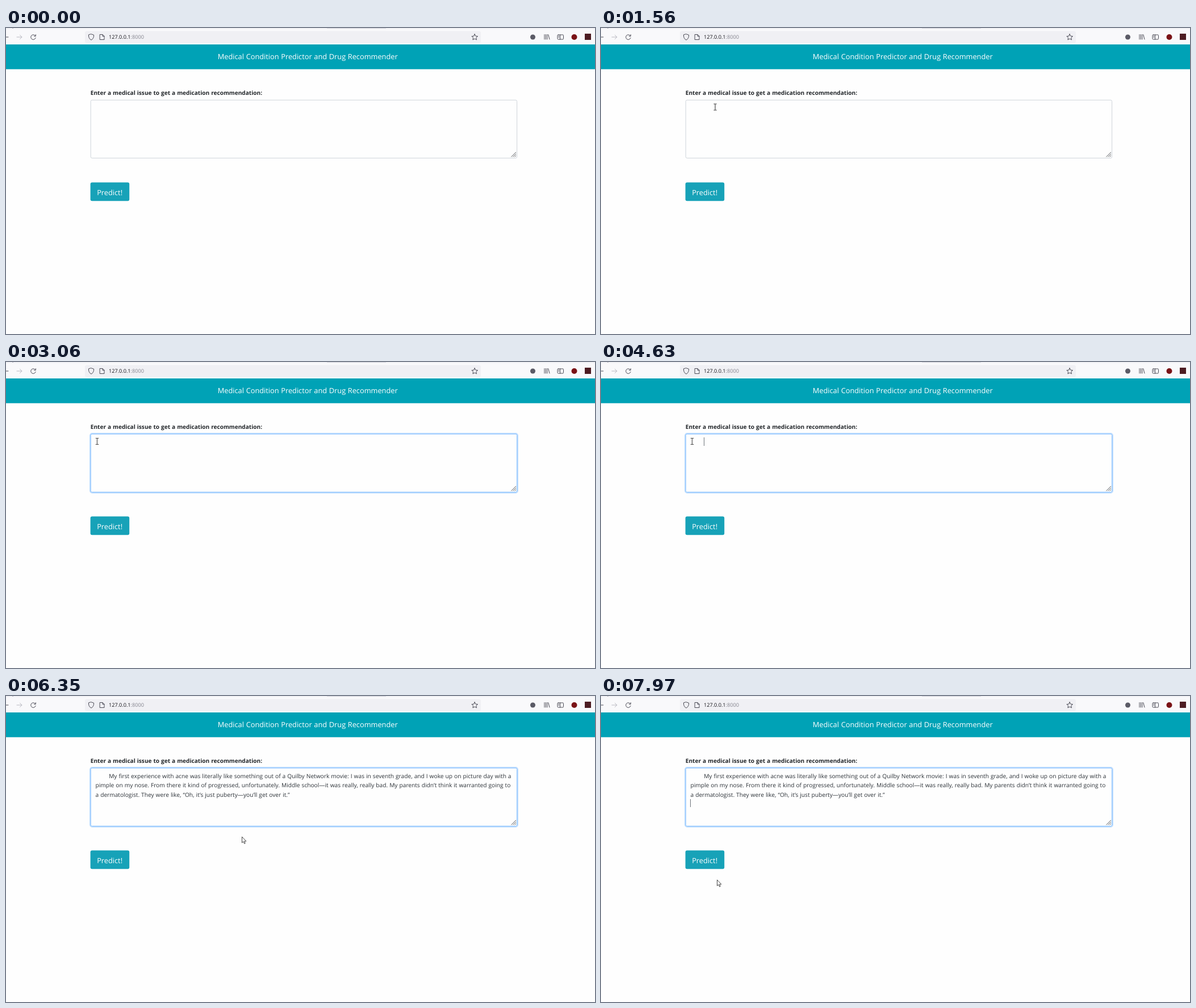
An HTML page for the animation above (8 s loop, 1037x540 px).

```html
<!DOCTYPE html>
<html lang="en">
<head>
<meta charset="utf-8">
<title>Medical Condition Predictor</title>
<style>
html, body { margin: 0; width: 100%; height: 100%; overflow: hidden; background: #fefefe; }
svg { display: block; }
text { font-family: "Open Sans", "Noto Sans", sans-serif; text-rendering: geometricPrecision; white-space: pre; }

.icon { fill: none; stroke: #4a4a55; stroke-width: 1; stroke-linecap: round; stroke-linejoin: round; }
.icon .off { stroke: #b9b9c1; }
.url { font-size: 9.15px; fill: #15141a; }
.url tspan { fill: #85858f; }
.large { font-size: 12.78px; word-spacing: .38px; fill: #fff; }
.label { font-size: 10.1px; font-weight: 700; word-spacing: .36px; fill: #212529; }
.entry { font-size: 10.19px; word-spacing: .36px; fill: #2c3238; }
.caret { fill: #6f757b; }

/* One 8 s clock drives every part */
.anim { animation: 8s step-end infinite; }
#field { animation-name: border; }
#ring { animation-name: ring; }
#caret1 { animation-name: caret1; }
#caret2 { animation-name: caret2; }
#entry { animation-name: paste; }
#pointer { animation-name: move; }
#arrow { animation-name: arrow; }
#beam { animation-name: beam; }

@keyframes border {
  0% { stroke: #ced4da; }
  32% { stroke: #a9c9ec; }
  32.75%, 100% { stroke: #80bdff; }
}
@keyframes ring {
  0% { opacity: 0; }
  32% { opacity: .03; }
  32.75%, 100% { opacity: .25; }
}
@keyframes caret1 {
  0%, 38.25%, 51.125%, 62.875%, 100% { opacity: 0; }
  30.375%, 44.5%, 57.875% { opacity: 1; }
}
@keyframes caret2 {
  0%, 65.375%, 78.375%, 92% { opacity: 0; }
  62.875%, 71.25%, 85.125%, 98.75%, 100% { opacity: 1; }
}
@keyframes paste {
  0% { opacity: 0; }
  62.875%, 100% { opacity: 1; }
}
@keyframes arrow {
  0%, 14.25% { opacity: 0; }
  7.5%, 78.375%, 100% { opacity: 1; }
}
@keyframes beam {
  0%, 78.375%, 100% { opacity: 0; }
  14.25% { opacity: 1; }
}
@keyframes move {
  0% { transform: translate(904px, 491px); }
  7.5% { transform: translate(904px, 491px); animation-timing-function: steps(2); }
  9.25% { transform: translate(488px, 232px); }
  14.25% { transform: translate(470px, 224px); animation-timing-function: steps(3); }
  16.875% { transform: translate(315px, 165px); animation-timing-function: steps(3); }
  19.5% { transform: translate(201px, 139.5px); animation-timing-function: steps(2); }
  21.125% { transform: translate(162.5px, 136px); }
  25.25% { transform: translate(161.5px, 138.5px); }
  26.125% { transform: translate(160.5px, 140px); }
  71.25% { transform: translate(165px, 142px); animation-timing-function: steps(4); }
  74.75% { transform: translate(278px, 183px); animation-timing-function: steps(4); }
  78.375% { transform: translate(397px, 236px); }
  79.375% { transform: translate(415px, 248px); }
  80.25% { transform: translate(427px, 266px); }
  81.125% { transform: translate(433px, 279px); }
  81.875% { transform: translate(434px, 282px); }
  97% { transform: translate(395px, 291px); animation-timing-function: steps(3); }
  99.625%, 100% { transform: translate(204px, 324px); }
}
</style>
</head>
<body>
<svg width="1037" height="540" viewBox="0 0 1037 540">
  <!-- Browser toolbar -->
  <rect width="1037" height="30" fill="#f9f9fb"/>
  <rect width="1037" height="1.5" fill="#f0f0f4"/>
  <rect x="565" width="104" height="1" fill="#d3d3dc"/>
  <rect x="11" width="2" height="1" fill="#b5b5be"/>
  <rect x="139" y="5.5" width="697" height="21" rx="3" fill="#f0f0f4"/>

  <g class="icon">
    <path d="M0 16H4"/>
    <path class="off" d="M19 16H28M24.5 12.5L28 16L24.5 19.5"/>
    <path d="M51.6 13.7A4.3 4.3 0 1 0 52.2 17.3M52.3 11.6V14.4H49.5"/>
    <path d="M150 10.8L154.6 12.3C154.8 16.5 153.2 19.6 150 21.2C146.8 19.6 145.2 16.5 145.4 12.3Z"/>
    <path d="M165.5 11.5H170L173 14.5V20.5H165.5ZM170 11.5V14.5H173"/>
    <path d="M825.2 10.8L826.8 14.2L830.5 14.6L827.8 17.1L828.5 20.8L825.2 19L821.9 20.8L822.6 17.1L819.9 14.6L823.6 14.2Z"/>
    <path d="M948 11.5V20M950.5 11.5V20M953 11.5V20M954.8 11.7L957 20"/>
    <rect x="971" y="12" width="10.5" height="8" rx="1.3"/>
    <path d="M975.5 12V20M972.8 14.3H973.8M972.8 16.3H973.8"/>
  </g>
  <circle cx="927.5" cy="16" r="4.5" fill="#5b5b66"/>
  <circle cx="1000.5" cy="16" r="5" fill="#7a1216"/>
  <rect x="1019" y="10" width="11" height="11" fill="#4d1c22"/>
  <text class="url" x="181" y="19.4">127.0.0.1<tspan>:8000</tspan></text>

  <!-- Page -->
  <rect y="29" width="1037" height="43.7" fill="#00a2b6"/>
  <text class="large" x="372.8" y="55">Medical Condition Predictor and Drug Recommender</text>
  <text class="label" x="148.8" y="118.4">Enter a medical issue to get a medication recommendation:</text>

  <rect id="ring" class="anim" x="148" y="126" width="753" height="105" rx="3.7" fill="none" stroke="#007bff" stroke-width="2"/>
  <rect id="field" class="anim" x="149.2" y="127.2" width="750.4" height="102.4" rx="2.4" fill="#fefefe"/>
  <path d="M889.5 227.5L898 219M892.5 227.5L898 222M895.5 227.5L898 225" stroke="#5c5f63" fill="none"/>

  <g id="entry" class="anim entry">
    <text x="181.2" y="145.1">My first experience with acne was literally like something out of a Quilby Network movie: I was in seventh grade, and I woke up on picture day with a</text>
    <text x="157.5" y="161.3">pimple on my nose. From there it kind of progressed, unfortunately. Middle school—it was really, really bad. My parents didn’t think it warranted going to</text>
    <text x="157.5" y="177.5">a dermatologist. They were like, “Oh, it’s just puberty—you’ll get over it.”</text>
  </g>
  <rect id="caret1" class="anim caret" x="181" y="133" width="1" height="15"/>
  <rect id="caret2" class="anim caret" x="157" y="182" width="1" height="14"/>

  <rect x="148.6" y="272.6" width="68.6" height="32.7" rx="3" fill="#17a2b8"/>
  <text class="large" x="160.2" y="294.7">Predict!</text>

  <!-- Mouse pointer -->
  <g id="pointer" class="anim">
    <path id="arrow" class="anim" d="M.5 .5V11L2.9 8.8L4.6 12.6L6.2 11.9L4.6 8.2H7.8Z" fill="#fff" stroke="#333" stroke-width=".9"/>
    <path id="beam" class="anim" d="M-2.5 -5.5H-.6L0 -5L.6 -5.5H2.5M0 -5V5M-2.5 5.5H-.6L0 5L.6 5.5H2.5" fill="none" stroke="#222"/>
  </g>
</svg>
</body>
</html>
```
